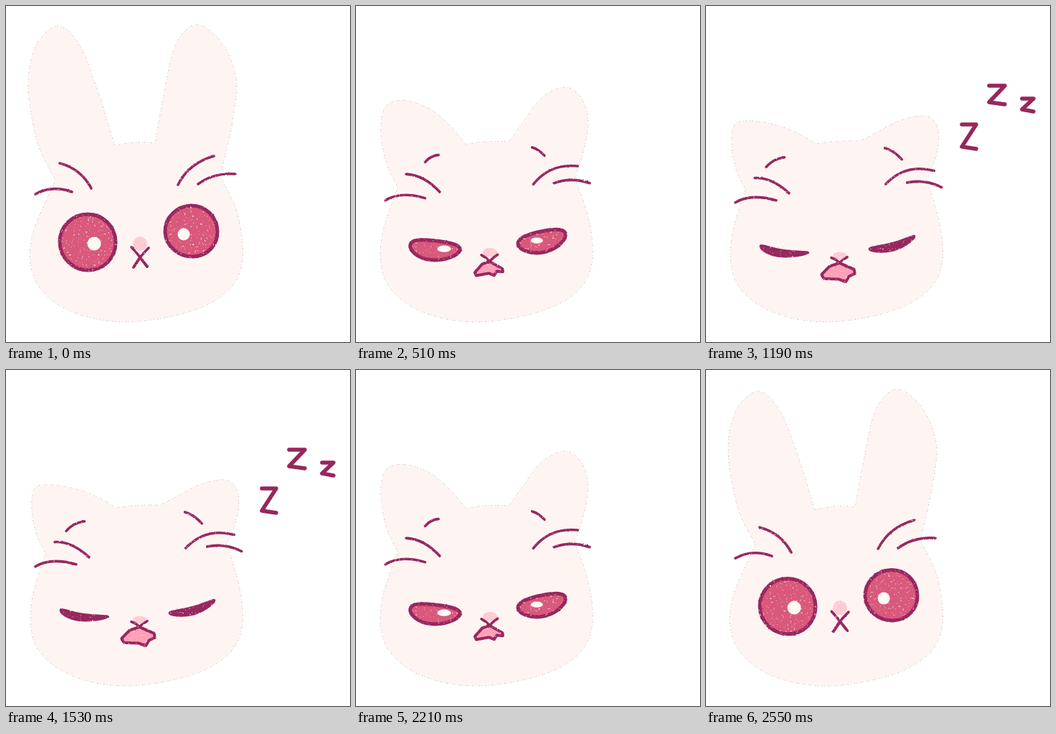
Write an HTML page that moves like this. It is 480 px wide and 468 px high and loops after 2720 ms.

```html
<!DOCTYPE html>
<html lang="en">
<head>
<meta charset="utf-8">
<title>Sleepy bunny cat</title>
<style>
html, body { margin: 0; width: 100%; height: 100%; overflow: hidden; background: #fff; }
svg { display: block; width: 480px; height: 468px; }
</style>
</head>
<body>
<svg viewBox="0 0 480 468">
  <filter id="chalk" filterUnits="userSpaceOnUse" x="0" y="0" width="480" height="468" color-interpolation-filters="sRGB">
    <feTurbulence id="grain" type="fractalNoise" baseFrequency=".35" numOctaves="2" result="n"/>
    <feDisplacementMap in="SourceGraphic" in2="n" scale="2" xChannelSelector="R" yChannelSelector="G" result="d"/>
    <feColorMatrix in="n" values="0 0 0 0 0  0 0 0 0 0  0 0 0 0 0  0 0 0 4 -.45" result="m"/>
    <feComposite in="d" in2="m" operator="in"/>
  </filter>
  <g id="art"></g>
</svg>
<script>
const STEP = 170, INK = '#97275d', PINK = '#d9587b';

// How sleepy the face is at each step; the loop runs through this and back
const SLEEPY = [0, .01, .37, .72, .87, 1, .99, .98, .99];

// Each part: key points awake, then asleep
const leftEar = ['69,243 44,190 31,112 42,55 73,28 103,55 128,118 152,195',
                 '55,256 42,228 36,195 40,167 62,162 100,168 130,179 154,192'];
const rightEar = ['208,191 220,125 236,56 265,26 300,50 321,100 316,160 299,237',
                  '216,188 243,175 272,162 305,156 321,166 325,187 320,215 308,243'];
const leftEye = ['75,329 114,290 153,329 115,368', '76,334 107,341 142,344 100,348'];
const rightEye = ['222,315 258,278 295,313 261,349', '228,339 262,331 291,321 262,340'];
const leftWhiskers = [['75,219 105,227 119,254', '68,240 92,239 116,261'],
                      ['41,262 64,249 92,259', '41,274 62,261 98,271']];
const rightWhiskers = [['240,249 255,219 290,209', '251,248 279,219 319,230'],
                       ['268,248 290,232 320,234', '281,246 305,241 329,253']];
const brows = [['131,198 131,198 131,198', '83,225 93,213 109,211'],
               ['235,194 235,194 235,194', '250,198 262,201 274,214']];
const lips = [['175,336 182,343 187,350', '175,351 182,353 186,358'],
              ['199,337 192,344 187,350', '197,350 191,353 186,358']];
const mouth = ['187,350 197,363 197,363 187,350 187,350 187,350 178,364 178,364 187,350',
               '186,358 207,367 208,373 200,377 195,385 185,381 164,380 161,374 172,363'];
const jaw = points('320,280 329,322 329,360 314,392 279,417 228,433 170,440 117,434 70,414 39,378 36,322');

function points(s) {
  return s.split(' ').map(p => p.split(',').map(Number));
}

const lerp = (a, b, k) => a + (b - a) * k;

function blend([awake, asleep], k) {
  const to = points(asleep);
  return points(awake).map((p, i) => p.map((v, j) => lerp(v, to[i][j], k)));
}

// Smooth curve through points, without the opening move
function curve(p, closed) {
  const n = p.length, tension = closed ? 3.6 : 6;
  const at = i => closed ? p[(i + n) % n] : p[Math.max(0, Math.min(n - 1, i))];
  let d = '';
  for (let i = 0; i < (closed ? n : n - 1); i++) {
    const [a, b, c, e] = [at(i - 1), at(i), at(i + 1), at(i + 2)];
    d += `C${[0, 1].map(j => b[j] + (c[j] - a[j]) / tension)} ${[0, 1].map(j => c[j] - (e[j] - b[j]) / tension)} ${c}`;
  }
  return d;
}

const path = (d, width, fill = 'none') =>
  `<path d="${d}" fill="${fill}" stroke="${INK}" stroke-width="${width}" stroke-linecap="round" stroke-linejoin="round"/>`;
const oval = (x, y, rx, ry, fill) =>
  `<ellipse cx="${x}" cy="${y}" rx="${rx}" ry="${ry}" fill="${fill}"/>`;
const stroke = ([a, b, c]) => path(`M${a}Q${b} ${c}`, 3.6);
const zed = (x, y, w, h, width) =>
  path(`M${x - w},${y - h}H${x + w}L${x - w},${y + h - 1}L${x + w},${y + h + 2}`, width);

function draw(k, step) {
  // the left side droops a little ahead of the right
  const lean = k * (1 - k) / 4, kl = k + lean, kr = k - lean;
  const shut = k > .95;

  const ears = [blend(leftEar, kl), blend(rightEar, kr)];
  const [[a, b], [c, e]] = ears.map(p => [p[0], p[p.length - 1]]);
  const head = `M${a}${curve(ears[0])}Q180,187 ${c}${curve(ears[1])}${curve([e, ...jaw, a])}Z`;

  const eye = p => path(`M${p[0]}${curve(p, true)}Z`, shut ? 2.5 : 5, shut ? INK : PINK);
  const strokes = [
    ...leftWhiskers.map(w => blend(w, k)),
    ...rightWhiskers.map(w => blend(w, kr)),
    ...lips.map(l => blend(l, k)),
    ...(k > .1 ? brows.map(w => blend(w, k)) : [])
  ];
  const lid = 1 - k * k;
  const shine = shut ? '' :
    oval(123, lerp(331, 341, k), 9.5, 9.5 * lid, '#fff8f5') +
    oval(lerp(248, 254, k), lerp(318, 330, k), 8.5, 8.5 * lid, '#fff8f5');
  const zs = [[367, 181, 10, 16], [406, 123, 11, 12], [449, 137, 8, 8]]
    .slice(0, Math.max(0, step - 3)).map(z => zed(...z, step > 5 ? 5.5 : 4.5));

  return `<path d="${head}" fill="#fef5f3" stroke="#000" stroke-opacity=".4" stroke-width=".5" stroke-dasharray="1 2 2 4"/>
    <g filter="url(#chalk)">
      ${oval(187, lerp(331, 348, k), 10, lerp(10, 5, k), '#ffcbd3')}
      ${eye(blend(leftEye, k))}${eye(blend(rightEye, kr))}
      ${path('M' + blend(mouth, k).join('L') + 'Z', 4, '#ffa0b6')}
      ${strokes.map(stroke).join('')}
    </g>${shine}${zs.join('')}`;
}

const art = document.getElementById('art'), grain = document.getElementById('grain');
const drawn = SLEEPY.map(draw);
let shown = -1;
function tick() {
  const i = Math.floor(performance.now() / STEP) % 16;
  const n = i > 8 ? 16 - i : i;
  if (n !== shown) {
    shown = n;
    grain.setAttribute('seed', n + 1);
    art.innerHTML = drawn[n];
  }
  requestAnimationFrame(tick);
}
tick();
</script>
</body>
</html>
```
